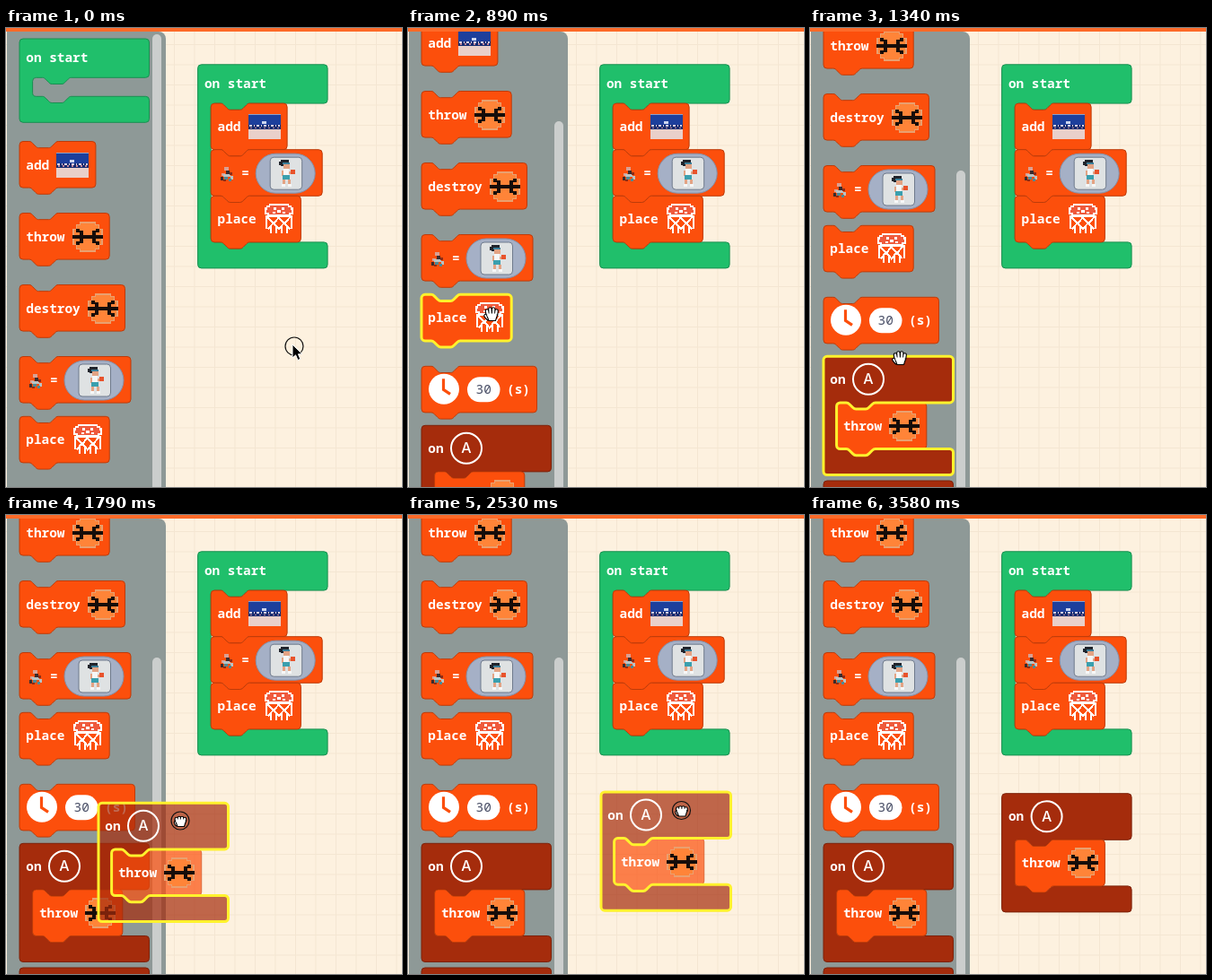
Animation of 441x512 px, one loop 5580 ms. Source, as an HTML page:

```html
<!DOCTYPE html>
<html lang="en">
<head>
<meta charset="utf-8">
<title>Block editor</title>
<style>
  html, body { margin: 0; width: 100%; height: 100%; overflow: hidden; background: #fdf1df; }
  svg { display: block; width: 441px; height: 512px; }
  text { font: 600 14.4px "Noto Sans Mono", "DejaVu Sans Mono", monospace; fill: #fff; white-space: pre; }
  .num { font-weight: 400; fill: #4b5068; }
  .letter { font: 500 16px Inter, Roboto, sans-serif; }
  .glow { fill: none; stroke: #fff22d; stroke-width: 3; stroke-linejoin: round; visibility: hidden; }
  .lit > .glow { visibility: visible; }
  .body { stroke-width: 1; }
  .lifted .body { fill-opacity: .7; stroke-opacity: .5; }
  .px { shape-rendering: crispEdges; }
</style>
</head>
<body>
<svg id="stage" viewBox="0 0 441 512"></svg>
<script>
const LOOP = 5580;
const GREEN = ['#20bf6b', '#188f50'];
const ORANGE = ['#fc4f0c', '#bd3b09'];
const RED = ['#a52c0c', '#7c2109'];
const ROW = 51.6, ARM = 29, INDENT = 14.6, WIDE = 144.5;

const at = (x, y, content, attrs = '') => `<g transform="translate(${x} ${y})" ${attrs}>${content}</g>`;
const rect = (x, y, w, h, fill, rx = 0) =>
  `<rect x="${x}" y="${y}" width="${w}" height="${h}" rx="${rx}" fill="${fill}"/>`;
const rects = (fill, ...list) => list.map(r => rect(...r, fill)).join('');
const label = (x, y, s, cls = '') => `<text x="${x}" y="${y}" class="${cls}">${s}</text>`;
const line = (d, color, width, extra = '') =>
  `<path d="${d}" fill="none" stroke="${color}" stroke-width="${width}" ${extra}/>`;

// Block outlines
const notch = d => `c${1.8 * d} 0 ${2.7 * d} .9 ${3.6 * d} 1.8l${3.6 * d} 3.6` +
  `c${.9 * d} .9 ${1.8 * d} 1.8 ${3.6 * d} 1.8h${10.8 * d}` +
  `c${1.8 * d} 0 ${2.7 * d} -.9 ${3.6 * d} -1.8l${3.6 * d} -3.6` +
  `c${.9 * d} -.9 ${1.8 * d} -1.8 ${3.6 * d} -1.8`;
const turn = (dx, dy, sweep = 1) => `a4 4 0 0 ${sweep} ${dx} ${dy}`;

const stackPath = w => `M0 4${turn(4, -4)}H10.8${notch(1)}H${w - 4}${turn(4, 4)}V${ROW - 4}` +
  `${turn(-4, 4)}H43.2${notch(-1)}H4${turn(-4, -4)}z`;

const mouthPath = (top, gap) => {
  const low = top + gap, end = low + ARM;
  return `M0 4${turn(4, -4)}H${WIDE - 4}${turn(4, 4)}V${top - 4}${turn(-4, 4)}` +
    `H${INDENT + 43.2}${notch(-1)}H${INDENT + 4}${turn(-4, 4, 0)}V${low - 4}${turn(4, 4, 0)}` +
    `H${INDENT + 10.8}${notch(1)}H${WIDE - 4}${turn(4, 4)}V${end - 4}${turn(-4, 4)}H4${turn(-4, -4)}z`;
};

const block = (x, y, path, [fill, edge], content, id = '') => at(x, y,
  `<path class="body" d="${path}" fill="${fill}" stroke="${edge}"/>${content}<path class="glow" d="${path}"/>`,
  id && `id="${id}"`);

// Small pictures, each centred on its own origin
const court = rects('#1d3f9c', [-18, -14, 36, 17]) + rects('#e9d0ca', [-18, 3, 36, 11]) +
  rects('#8fa0c8', [-18, -14, 36, 1]) + rects('#142b70', [-18, -2, 36, 5]) +
  line('M-17 -1H17', '#d9cfe0', 2, 'stroke-dasharray="3 2 1 2"') +
  line('M-16 1.5H17', '#c2889a', 1.5, 'stroke-dasharray="2 3"') +
  rects('#cdd6ee', [-3, -6, 5, 3]);

const ball = rects('#e9a070', [-9, -17, 18, 34], [-13, -14, 26, 28], [-17, -9, 34, 18]) +
  rects('#ff8438', [-8, -15, 16, 30], [-12, -13, 24, 26], [-15, -8, 30, 16]) +
  rects('#160d0a', [-17, -2, 34, 4],
    ...[-1, 1].flatMap(s => [[s * 7 - 2, -7, 4, 14], [s * 11 - 2, -9, 4, 4], [s * 11 - 2, 5, 4, 4]]));

const hoop = rects('#fff', [-11, -17, 22, 2], [-14, -15, 28, 2], [-16, -13, 32, 8], [-13, -5, 26, 3]) +
  rects('#ef5a3c', [-10, -15, 20, 2], [-13, -13, 26, 3], [-14, -10, 28, 3], [-11, -7, 22, 2]) +
  rects('#fff', [-6, -13, 3, 3], [3, -13, 3, 3], [-2, -10, 4, 3], [-7, -8, 3, 2], [4, -8, 3, 2]) +
  line('M-14 -4V11M14 -4V11M-13 -3L-6 5L0 -2L6 5L13 -3M-12 11L-6 4L0 11L6 4L12 11M-9 8V16M-3 8V16M3 8V16M9 8V16',
    '#fff', 2);

const player = rects('#20242c', [-6, -15, 9, 7], [-8, -13, 3, 4]) + rects('#3b7f9a', [-4, -12, 8, 2]) +
  rects('#e3a384', [-3, -10, 7, 5], [-5, -3, 3, 6], [3, -2, 4, 3], [-4, 7, 3, 5], [2, 7, 3, 5]) +
  rects('#f6f7f7', [-3, -5, 6, 7], [-5, 12, 4, 3], [2, 12, 4, 3]) +
  rects('#3a9fae', [-4, 2, 8, 5]) + rects('#e8532c', [5, -4, 5, 5]);

const badge = rects('#d9a093', [-3, -8, 5, 4], [-6, -1, 4, 3]) + rects('#3a2b2c', [-1, -4, 4, 5], [-7, 3, 3, 4]) +
  rects('#b9c3c4', [-4, 0, 8, 3], [4, 2, 3, 4]) + rects('#4d8993', [-3, 3, 4, 3], [2, 5, 3, 3]) +
  rects('#8e2c16', [3, -2, 3, 3], [-4, 6, 3, 2]);

const icon = (x, y, art) => at(x, y, art, 'class="px"');

// Blocks
const command = (x, y, word, art, artWidth, id) => {
  const artX = 15.5 + word.length * 8.64;
  return block(x, y, stackPath(artX + artWidth + 7.5), ORANGE,
    label(7.3, 31, word) + icon(artX + artWidth / 2, 26, art), id);
};
const add = (x, y) => command(x, y, 'add', court, 36);
const toss = (x, y) => command(x, y, 'throw', ball, 34);
const place = (x, y, id) => command(x, y, 'place', hoop, 34, id);

const assign = (x, y, id) => block(x, y, stackPath(124), ORANGE,
  icon(17.5, 27, badge) + label(34, 31, '=') +
  '<rect x="50" y="4.5" width="66" height="44" rx="22" fill="#a5b0c6" stroke="#8490aa"/>' +
  '<rect x="66" y="8.5" width="35.5" height="36" rx="4" fill="#dfe2e3" stroke="#6f7a8c"/>' +
  icon(83.5, 26.5, player), id);

const timer = (x, y, id) => block(x, y, stackPath(128.5), ORANGE,
  '<circle cx="25" cy="25.5" r="17" fill="#fff"/>' + line('M24.5 14V26L32 31', ORANGE[0], 3.2) +
  rect(51, 12, 36.5, 28, '#fff', 14) + label(60.5, 31, '30', 'num') + label(95, 31, '(s)'), id);

const onStart = (x, y, gap) => block(x, y, mouthPath(43.3, gap), GREEN, label(7.3, 26, 'on start'));

const onButton = (x, y, id) => block(x, y, mouthPath(ROW, ROW), RED,
  label(7.3, 30.5, 'on') + '<circle cx="50" cy="25.5" r="17" fill="none" stroke="#fff" stroke-width="2"/>' +
  '<text class="letter" x="50" y="31.2" text-anchor="middle">A</text>' + toss(INDENT, ROW), id);

// Pointers
const fingers = d => line(d, '#000', 4.6, 'stroke-linecap="round"') + line(d, '#fff', 2.3, 'stroke-linecap="round"');
const palm = '<path d="M-5.5 0L-3 6.5H4.5L6.5 0z" fill="#fff" stroke="#000" stroke-width="1.1"/>' +
  rect(-4.8, -1.5, 10.4, 3, '#fff');
const pointers = {
  arrow: '<path d="M0 0V15L3.6 11.8L6 17.5L8.8 16.3L6.4 10.8H11z" fill="#000" stroke="#fff"/>',
  open: fingers('M-6.5 1L-4 4M-4.2 0L-5 -4.5M-1.2 0L-1.6 -6.5M2 0L2.2 -6.5M5 0L5.6 -4.5') + palm,
  fist: fingers('M-5 2L-4 4M-4.2 0V-2M-1.2 0V-3M2 0V-3M5 0V-2') + palm
};

const stage = document.getElementById('stage');
stage.innerHTML = `
  <defs>
    <pattern id="grid" width="22.5" height="22.5" x="187" y="18" patternUnits="userSpaceOnUse">
      <path d="M.5 0V22.5M0 .5H22.5" stroke="#f4e6d2" fill="none"/>
    </pattern>
  </defs>
  ${rect(0, 0, 441, 512, '#fdf1df')}${rect(0, 0, 441, 512, 'url(#grid)')}
  ${onStart(213.6, 40.8, ROW * 3)}
  ${add(228.2, 84.1)}${assign(228.2, 84.1 + ROW)}${place(228.2, 84.1 + ROW * 2)}
  <path d="M1 4H170a8 8 0 0 1 8 8V512H1z" fill="#8e9997"/>
  <g id="list">
    ${onStart(15, 12, 21)}${add(15, 126.5)}${toss(15, 206.5)}
    ${command(15, 286.5, 'destroy', ball, 34, 'destroy')}
    ${assign(15, 366.5, 'assign')}${place(15, 433.3, 'place')}${timer(15, 513.3, 'timer')}
    ${onButton(15, 579.3, 'button')}${onButton(15, 718, 'next')}
  </g>
  <rect id="bar" x="163" width="10" height="600" rx="5" fill="#cbcecd"/>
  ${rect(0, 0, 441, 4, '#fd6a28')}
  ${onButton(0, 0, 'held')}
  <g id="pointer">
    <circle id="ring" r="10" fill="none" stroke="#111" stroke-width="1.2"/>
    ${Object.entries(pointers).map(([name, art]) => `<g id="${name}">${art}</g>`).join('')}
  </g>`;

// start, scroll, lit block, pointer, x, y, ring, held block x, y
const steps = [
  [0, 0, '', 'arrow', 319, 353, true],
  [150, 0, '', 'arrow', 209, 320, false],
  [300, 0, 'destroy', 'open', 104, 338, false],
  [600, 38, '', 'arrow', 92, 318, false],
  [740, 90, 'assign', 'open', 93, 320, false],
  [890, 136, 'place', 'open', 93, 320, false],
  [1040, 178, 'timer', 'open', 95, 336, false],
  [1190, 203, 'timer', 'open', 98, 355, false],
  [1340, 213, 'button', 'open', 100, 369, false],
  [1490, 213, 'button', 'fist', 107, 388, true],
  [1640, 213, 'held', 'fist', 137, 364, true, 46, 344],
  [1790, 213, 'held', 'fist', 194, 341, true, 103, 321.3],
  [1940, 213, 'held', 'fist', 243, 333, true, 152, 313],
  [2090, 213, 'held', 'fist', 286, 329, true, 196, 309],
  [2390, 213, 'held', 'fist', 295, 329, true, 205, 309],
  [2530, 213, 'held', 'fist', 304.5, 329.5, true, 215, 309],
  [2830, 213, 'held', 'fist', 302, 332, false, 213.6, 310.7],
  [2980, 213, 'held', 'open', 302, 332, false, 213.6, 310.7],
  [3580, 213, '', '', 0, 0, false, 213.6, 310.7]
];

const el = id => document.getElementById(id);
const show = (id, on) => { el(id).style.display = on ? '' : 'none'; };
const move = (id, x, y) => el(id).setAttribute('transform', `translate(${x} ${y})`);
const litIds = ['destroy', 'assign', 'place', 'timer', 'button', 'held'];
let current;

function draw(time) {
  const step = steps.findLast(s => s[0] <= time);
  if (step === current) return;
  current = step;
  const [start, scroll, lit, pointer, x, y, ring, heldX, heldY] = step;
  move('list', 0, -scroll);
  el('bar').setAttribute('y', 7 + scroll * .714);
  litIds.forEach(id => el(id).classList.toggle('lit', id === lit));
  Object.keys(pointers).forEach(name => show(name, name === pointer));
  move('pointer', x, y);
  show('ring', ring);
  move('ring', pointer === 'arrow' ? 2 : 0, pointer === 'arrow' ? 2 : 0);
  show('held', heldX !== undefined);
  if (heldX !== undefined) move('held', heldX, heldY);
  el('held').classList.toggle('lifted', start < 2830);
}

const begin = performance.now();
function tick() {
  draw((performance.now() - begin) % LOOP);
  requestAnimationFrame(tick);
}
tick();
</script>
</body>
</html>
```
